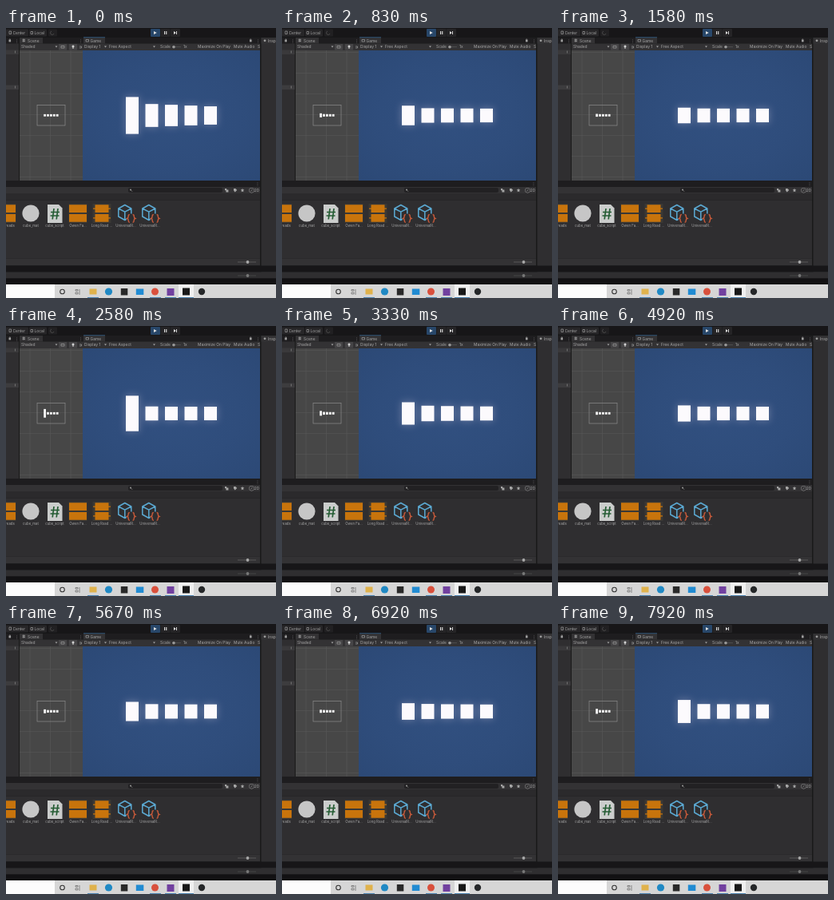
Recreate the animation shown at these times as an HTML page. Size 338x338 px, loop 8000 ms.

```html
<!DOCTYPE html>
<html lang="en">
<head>
<meta charset="utf-8">
<title>Editor with audio bars</title>
<style>
html, body { margin: 0; width: 100%; height: 100%; overflow: hidden; background: #191919; }
svg { display: block; width: 100vw; height: 100vh; }
text { font: 4.9px Inter, sans-serif; fill: #a6a6a6; white-space: pre; }
.label { font-size: 4.3px; text-anchor: middle; }
</style>
</head>
<body>
<svg id="stage" viewBox="0 0 338 338">
  <defs>
    <radialGradient id="sky" cx=".5" cy=".5" r=".7">
      <stop offset="0" stop-color="#315080"/>
      <stop offset=".55" stop-color="#2f4d7c"/>
      <stop offset="1" stop-color="#2c4976"/>
    </radialGradient>
    <filter id="blur" filterUnits="userSpaceOnUse" x="96" y="28" width="222" height="163">
      <feGaussianBlur stdDeviation="5"/>
    </filter>
    <pattern id="grid" x="5" y="5" width="25.5" height="26" patternUnits="userSpaceOnUse">
      <path d="M25 0V26M0 25.5H25.5" stroke="#565656" stroke-width=".6"/>
    </pattern>
    <clipPath id="game"><rect x="96" y="28" width="222" height="163"/></clipPath>
    <g id="asset">
      <path d="M0-10 8-5.5V4.5L0 9-8 4.5V-5.5ZM-8-5.5 0-1.3 8-5.5M0-1.3V9" fill="none" stroke="#5ba9d2" stroke-width="1.5" stroke-linejoin="round"/>
      <rect x="2" y="1" width="11.5" height="11.5" fill="#2f2e30"/>
      <path d="M6 2Q4.4 2 4.4 4T2.8 7Q4.4 7.4 4.4 9.6T6 12M9.8 2Q11.4 2 11.4 4T13 7Q11.4 7.4 11.4 9.6T9.8 12" fill="none" stroke="#c4593a" stroke-width="1.5"/>
    </g>
    <g id="clip">
      <rect x="-11.5" y="-12" width="23" height="24" fill="#3a3835"/>
      <path d="M-11-10.8H11V-1H-11ZM-11 1H11V10.8H-11Z" fill="#c8740c"/>
    </g>
    <g id="sparseClip">
      <rect x="-11.5" y="-12" width="23" height="24" fill="#3a3835"/>
      <path d="M-8.5-10.8H8.5V-1H-8.5ZM-8.5 1H8.5V10.8H-8.5ZM-11-6.6H11V-5.2H-11ZM-11 5.2H11V6.6H-11Z" fill="#c8740c"/>
    </g>
  </defs>
  <g id="chrome"></g>
  <rect x="17" y="28" width="79" height="163" fill="#474747"/>
  <rect x="17" y="28" width="79" height="163" fill="url(#grid)"/>
  <rect x="39" y="96.5" width="35" height="25.5" fill="none" stroke="#8c8c8c" stroke-width=".7"/>
  <g id="minis"></g>
  <rect x="96" y="28" width="222" height="163" fill="url(#sky)"/>
  <g clip-path="url(#game)">
    <g id="glow" opacity=".3" filter="url(#blur)"></g>
    <g id="bars"></g>
  </g>
  <g id="icons">
    <use href="#clip" x="1" y="232"/>
    <circle cx="31" cy="232" r="10.6" fill="#c6c6c6"/>
    <path d="M52 221H66L70.5 225.5V244H52Z" fill="#cbcdcc"/>
    <path d="M60 226 58.2 239.5M65 226 63.2 239.5M56 230.5H67M55.5 235H66.5" stroke="#245c33" stroke-width="1.7"/>
    <use href="#clip" x="90" y="232"/>
    <use href="#sparseClip" x="120" y="232"/>
    <use href="#asset" x="148.8" y="231.5"/>
    <use href="#asset" x="178.8" y="231.5"/>
  </g>
</svg>
<script>
const NS = "http://www.w3.org/2000/svg";
const byId = id => document.getElementById(id);

function add(parent, tag, attrs, content = "") {
  const el = document.createElementNS(NS, tag);
  for (const key in attrs) el.setAttribute(key, attrs[key]);
  el.textContent = content;
  return parent.appendChild(el);
}
const chrome = byId("chrome"), icons = byId("icons");
const PANEL = "#2f2e30", TAB = "#333234", DARK = "#1e1d1f";
const rect = (x, y, width, height, fill, rx = 0, parent = chrome) =>
  add(parent, "rect", { x, y, width, height, fill, rx });
const dot = (cx, cy, r, fill) => add(chrome, "circle", { cx, cy, r, fill });
const path = (d, fill = "#a6a6a6") => add(chrome, "path", { d, fill });
const line = (d, stroke = "#a0a0a0", width = .7) =>
  add(chrome, "path", { d, fill: "none", stroke, "stroke-width": width });
const text = (x, y, s) => add(chrome, "text", { x, y }, s);
const label = (x, s) => add(icons, "text", { x, y: 249.3, class: "label" }, s);
const arrow = (x, y) => path(`M${x} ${y}h3l-1.5 2z`);
const lock = x => {
  line(`M${x + .6} 15v-1h1.4v1`);
  rect(x, 15, 2.6, 2.4, "#a0a0a0");
};

function slider(y, track, knob) {
  line(`M290 ${y}h23`, track, .8);
  dot(302.5, y, 1.9, knob);
}

function drawEditor() {
  // Main toolbar
  rect(0, 0, 338, 11.5, "#171618");
  rect(0, 1.5, 28, 9, "#272628", 1);
  rect(29, 1.5, 22, 9, "#272628", 1);
  rect(53, 1.5, 11, 9, "#212022", 1);
  line("M4 4h2.5v3.5h-2.5z");
  line("M31 4.5h2.5v3h-2.5z");
  line("M57 4a2.3 2.3 0 1 0 3 3", "#5c5c5c");
  text(8.5, 7.9, "Center");
  text(35.5, 7.9, "Local");
  rect(181, 1, 12, 10, "#28476a", 1);
  rect(193.5, 1, 12, 10, "#252426");
  rect(206, 1, 12, 10, "#252426", 1);
  path("M185 4l3.8 2-3.8 2zM198 4h1.1v4h-1.1zM200.2 4h1.1v4h-1.1zM210 4l2.8 2-2.8 2zM213 4h.9v4h-.9z", "#e0e0e0");

  // Hierarchy and view tabs
  rect(0, 12, 16, 179, PANEL);
  rect(0, 12, 16, 7.5, DARK);
  rect(0, 27.5, 16, 5.5, "#3a393b");
  rect(0, 71.5, 16, 5.5, "#3d3c3e");
  line("M11.5 28.5v3M11.5 72.5v3", "#888");
  lock(3.5);
  text(11, 17.6, "⋮");
  rect(17, 12, 79, 7.5, DARK);
  rect(17, 12, 29, 7.5, TAB);
  line("M20.5 14.7h3.5M20.5 16.5h3.5M21.5 13.5v4M23 13.5v4");
  text(27, 17.7, "Scene");
  text(91, 17.6, "⋮");
  rect(17, 19.5, 79, 8.5, TAB);
  text(19, 25.2, "Shaded");
  arrow(61.5, 22.5);
  rect(66, 20, 10, 7.5, "#464547");
  rect(79, 20, 10, 7.5, "#464547");
  line("M69 22.5h4v2.5h-4z");
  dot(84, 23, 1.5, "#d2d2d2");
  line("M84 24v2", "#d2d2d2", 1);
  line("M92 23h2.5v2h-2.5");

  rect(96, 12, 222, 7.5, DARK);
  rect(97, 12, 27, 7.5, TAB);
  line("M97 11.7h27", "#356a9c");
  line("M100 14.5h3.5v2.5h-3.5z");
  text(105.5, 17.7, "Game");
  text(313, 17.6, "⋮");
  rect(96, 19.5, 222, 8.5, TAB);
  text(98, 25.2, "Display 1");
  arrow(123, 22.5);
  text(129, 25.2, "Free Aspect");
  arrow(184, 22.5);
  text(193, 25.2, "Scale");
  line("M208 23.7h11", "#5c5c5c");
  dot(210, 23.7, 1.8, "#9c9c9c");
  text(222, 25.4, "1x");
  text(240, 25.2, "Maximize On Play");
  text(285, 25.2, "Mute Audio");
  text(315, 25.2, "S");

  // Inspector
  rect(319.5, 12, 18.5, 301, PANEL);
  rect(319.5, 12, 18.5, 7.5, TAB);
  dot(324, 15.8, 1.4, "#a0a0a0");
  text(328, 17.7, "Inspector");

  // Project panel
  rect(0, 191, 318, 8, DARK);
  lock(305);
  text(312.5, 197, "⋮");
  rect(0, 199, 318, 8, TAB);
  rect(153, 200, 118, 6, "#222123", 2);
  dot(156, 202.6, 1, "#999");
  line("M156.5 203.2l1.5 1.5");
  path("M274 201h2.2v1.6h2.2v3h-3v-2.4h-1.4zM285 201h2.5l1.7 2-2.5 2.4-1.7-1.9zM296 200.8l.7 1.5 1.6.2-1.2 1.1.3 1.7-1.4-.9-1.4.9.3-1.7-1.2-1.1 1.6-.2z");
  text(304, 205, "⊘20");
  rect(0, 207, 318, 9, "#2b2a2c");
  rect(0, 215.5, 318, .6, "#222");
  rect(0, 216, 318, 72.5, PANEL);
  rect(0, 288.5, 318, 9, TAB);
  slider(293, "#636363", "#a8a8a8");
  rect(0, 297.5, 338, 8, "#171618");
  rect(0, 305.5, 338, 8, PANEL);
  slider(310, "#4a4a4a", "#777");
  rect(0, 313.5, 338, 7.5, "#121113");

  label(5, "reads");
  label(31, "cube_mat");
  label(61, "cube_script");
  label(90, "Owen Fa...");
  label(120, "Long Road ...");
  label(150, "UniversalR...");
  label(180, "UniversalR...");
}

function drawTaskbar() {
  rect(0, 321, 338, 17, "#d6d6d6");
  rect(0, 321, 61, 17, "#fcfcfc");
  rect(216, 321, 19, 17, "#f0f0f0");
  add(chrome, "circle", { cx: 70.5, cy: 330, r: 2.8, fill: "none", stroke: "#333", "stroke-width": 1.1 });
  line("M87 327.5h3v1.5h-3zM87 331h3v2h-3zM92 327v7", "#666");
  rect(104.5, 326.5, 9, 7, "#e0b24c");
  dot(128.5, 330, 4.6, "#2089c4");
  rect(143.8, 326, 8.5, 8.5, "#292929");
  rect(162.8, 326.5, 9.5, 7.5, "#218bd2");
  dot(186.5, 330, 4.5, "#d9503c");
  rect(201.5, 326, 9, 9, "#71409f");
  rect(221, 325.5, 9, 9, "#181818");
  dot(245, 330, 4.2, "#252729");
  for (const x of [102, 180, 199]) rect(x, 337, 14, 1, "#4c83b0");
  rect(216, 337, 19, 1, "#4c83b0");
}

const LOOP = 8000, STEP = LOOP / 96, REST = 17, DECAY = 150, MID = 109.5;

// Each beat: time, then the kick given to the five bars.
const beats = [
  [0, 30, 12, 10, 8, 6],
  [620, 32, 5, 3, 2, 1],
  [1250, 24, 5, 3, 2, 1],
  [1910, 30, 5, 2, 1, 1],
  [2500, 49, 1, 0, 0, 0],
  [3160, 36, 8, 5, 3, 2],
  [4080, 9, 8, 1, 3, 1],
  [4410, 96, 8, 4, 2, 1],
  [5000, 30, 5, 3, 2, 1],
  [5410, 40, 8, 5, 4, 4],
  [6080, 32, 6, 4, 3, 2],
  [6580, 36, 18, 11, 8, 4],
  [7250, 28, 5, 3, 2, 1],
  [7750, 37, 5, 4, 3, 2]
];

function height(i, time) {
  let kick = 0;
  for (const beat of beats) {
    const age = time - beat[0];
    if (age >= 0) kick = Math.max(kick, beat[i + 1] * Math.exp(-age / DECAY));
  }
  return REST + kick;
}

drawEditor();
drawTaskbar();

const rows = [0, 1, 2, 3, 4].map(i => {
  const x = 150 + i * 24.5;
  return {
    bar: rect(x, 0, 16, 0, "#fcfafd", 0, byId("bars")),
    glow: rect(x - 1, 0, 18, 0, "#cfc4da", 0, byId("glow")),
    mini: rect(47.2 + i * 3.9, 0, 2.8, 0, "#f6f6f6", 0, byId("minis"))
  };
});

function setHeight(el, h, mid) {
  el.setAttribute("y", mid - h / 2);
  el.setAttribute("height", h);
}

function render(ms) {
  const time = Math.floor((ms % LOOP + 5) / STEP) * STEP + 4;
  rows.forEach(({ bar, glow, mini }, i) => {
    const h = height(i, time);
    setHeight(bar, h, MID);
    setHeight(glow, h + 2, MID);
    // The scene view trails the game view by one step.
    setHeight(mini, height(i, time - STEP) / 6, 109.3);
  });
}

const start = performance.now();
function tick() {
  render(performance.now() - start);
  requestAnimationFrame(tick);
}
tick();
</script>
</body>
</html>
```
